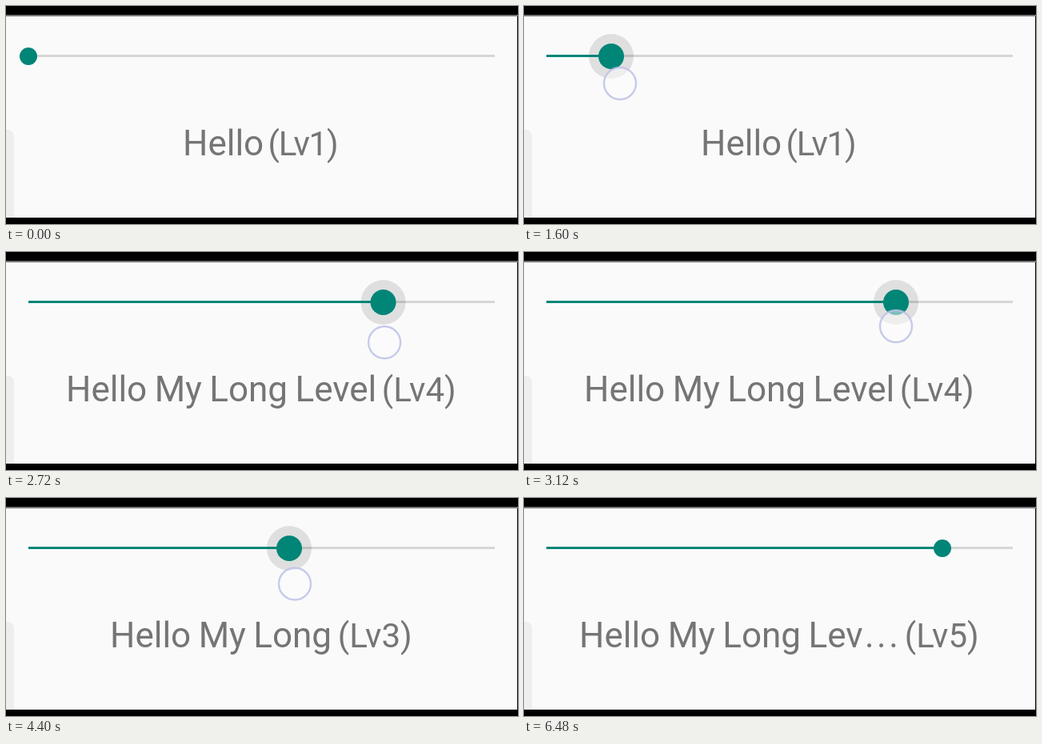
Recreate the animation shown at these times as an HTML page with a canvas. Size 640x273 px, loop 6.56 s.

```html
<!DOCTYPE html>
<html lang="en">
<head>
<meta charset="utf-8">
<title>Slider levels</title>
<style>
html, body { margin: 0; width: 100%; height: 100%; overflow: hidden; background: #000; }
canvas { display: block; }
</style>
</head>
<body>
<canvas id="stage" width="640" height="273"></canvas>
<script>
const ctx = document.getElementById('stage').getContext('2d');
const LOOP = 6560, STEP = 80;
const LEFT = 28, RIGHT = 611, MID = 62.5;
const TEAL = '#008577';
const PRESS = 1200, RELEASE = 5360;

// [time, value] knots of the drag
const thumbX = [[1280, 28], [1600, 109], [1920, 204], [2320, 331], [2640, 437], [2880, 523],
  [3120, 465], [3360, 345], [3680, 202], [3860, 152], [4080, 216], [4400, 354], [4800, 478], [5120, 523]];
const touchY = [[1280, 86], [1600, 97], [2320, 124.5], [2800, 110], [3120, 93], [3680, 146.5],
  [4400, 107.5], [5120, 100]];
const touchLead = [[1280, 6], [1600, 11], [2320, 4.5], [3120, 0], [3680, 0], [4400, 7], [5120, 2]];

// Each level: words, their left edge, the right edge of the suffix
const LEVELS = [
  ['Hello', 224, 413],
  ['Hello My', 187, 451],
  ['Hello My Long', 133, 505],
  ['Hello My Long Level', 78, 560],
  ['Hello My Long Lev', 72, 566]
];

const clamp = v => Math.max(0, Math.min(1, v));

// Monotone cubic through the knots
function follow(knots, t) {
  const last = knots.length - 1;
  if (t <= knots[0][0]) return knots[0][1];
  if (t >= knots[last][0]) return knots[last][1];
  const slope = i => (knots[i + 1][1] - knots[i][1]) / (knots[i + 1][0] - knots[i][0]);
  const tangent = i => {
    if (i === 0) return slope(0);
    if (i === last) return 0;
    const a = slope(i - 1), b = slope(i);
    return a * b > 0 ? 2 * a * b / (a + b) : 0;
  };
  const i = knots.findIndex(k => k[0] > t) - 1;
  const [t0, v0] = knots[i], [t1, v1] = knots[i + 1];
  const d = t1 - t0, u = (t - t0) / d, w = 1 - u;
  return v0 * (1 + 2 * u) * w * w + tangent(i) * d * u * w * w +
    v1 * u * u * (3 - 2 * u) - tangent(i + 1) * d * u * u * w;
}

function rect(color, x, y, w, h) {
  ctx.fillStyle = color;
  ctx.fillRect(x, y, w, h);
}

function disc(color, x, y, r) {
  ctx.fillStyle = color;
  ctx.beginPath();
  ctx.arc(x, y, r, 0, 7);
  ctx.fill();
}

// Places the ink of the text against a left or right edge
function label(text, edge, size, spacing = 0, toRight = false) {
  ctx.font = `${size}px Roboto, sans-serif`;
  ctx.letterSpacing = spacing + 'px';
  ctx.wordSpacing = '-1.5px';
  const m = ctx.measureText(text);
  ctx.fillText(text, toRight ? edge - m.actualBoundingBoxRight : edge + m.actualBoundingBoxLeft, 187);
}

function drawText(level) {
  const [words, left, right] = LEVELS[level];
  ctx.fillStyle = '#757575';
  label(words, left, 44);
  if (level === 4) label('...', 429, 44, 3.5);
  label(`(Lv${level + 1})`, right, 42, level ? 0 : -1.2, true);
}

function drawTouch(x, y) {
  disc('rgba(253,253,255,.5)', x, y, 20);
  ctx.strokeStyle = 'rgba(190,194,232,.85)';
  ctx.lineWidth = 2.4;
  ctx.stroke();
}

function draw(t) {
  rect('#000', 0, 0, 640, 273);
  rect('#fafafa', 0, 13, 639, 252);
  rect('#777', 0, 11, 640, 2);
  ctx.fillStyle = '#eee';
  ctx.beginPath();
  ctx.roundRect(-10, 155, 20, 110, [0, 8, 0, 0]);
  ctx.fill();

  const x = follow(thumbX, t);
  const press = clamp((t - PRESS) / 160) * clamp(1 - (t - RELEASE) / 160);
  rect('#d6d6d6', LEFT, MID - 1.5, RIGHT - LEFT, 3);
  disc(`rgba(0,0,0,${0.11 * press})`, x, MID + 0.5, 16 + 12 * press);
  rect(TEAL, LEFT, MID - 1.5, x - LEFT, 3);
  disc(TEAL, x, MID + 0.5, 11 + 5 * press);

  drawText(Math.min(4, Math.floor((x - LEFT) / (RIGHT - LEFT) * 5)));
  if (t > PRESS && t < RELEASE) drawTouch(x + follow(touchLead, t), follow(touchY, t));
}

const start = performance.now();
function frame() {
  const t = (performance.now() - start) % LOOP;
  draw(Math.floor(t / STEP) * STEP);
  requestAnimationFrame(frame);
}
frame();
</script>
</body>
</html>
```
